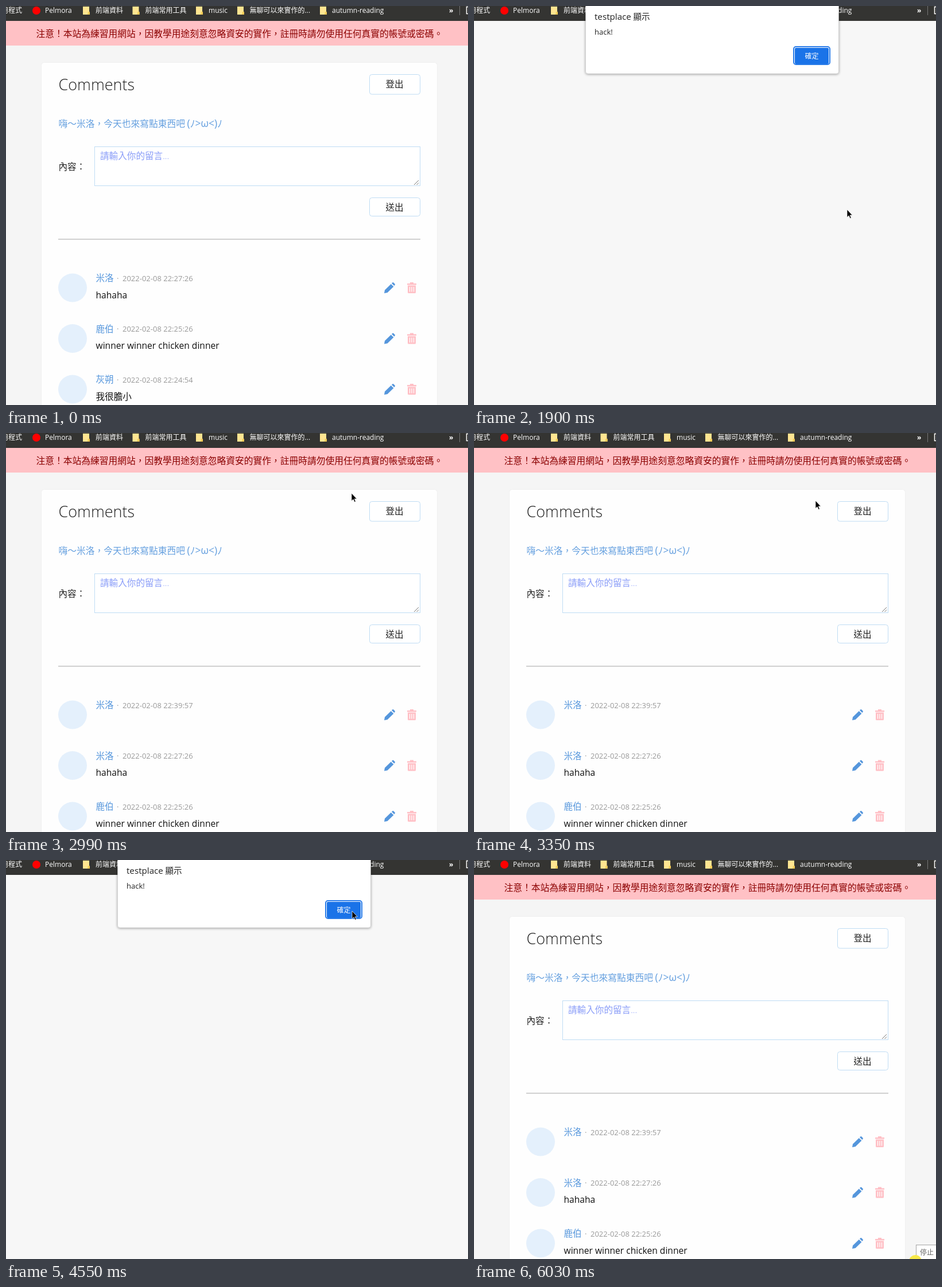
An HTML page that plays this animation: 805x696 px, repeating every 6060 ms.

```html
<!DOCTYPE html>
<html lang="zh-Hant">
<head>
<meta charset="utf-8">
<style>
html, body { margin: 0; width: 100%; height: 100%; overflow: hidden; background: #f5f5f5; }
svg { display: block; font: 15.6px "Open Sans", "Noto Sans CJK TC", "Noto Sans CJK JP", sans-serif; }
text { white-space: pre; }
.bar { font-size: 12px; fill: #fff; }
.thin { font-weight: 300; }
.name { font-weight: 500; fill: #5596dc; }
.date { font-size: 13px; fill: #999; }
.line { fill: #fff; stroke: #bfdcf4; }
</style>
</head>
<body>
<svg id="stage" width="805" height="696" viewBox="0 0 805 696">
  <defs>
    <filter id="soft" x="-10%" y="-10%" width="120%" height="125%">
      <feDropShadow dx="0" dy="1" stdDeviation="2" flood-opacity=".4"/>
    </filter>
    <g id="folder">
      <path d="M0 1h11v9h1v5H0z" fill="#ffe591"/>
      <path d="M9 10h3v5H8z" fill="#f5cc58"/>
    </g>
    <g id="icons">
      <path fill="#5596dc" d="M659 501l1-5.500 10.800-10.600 4.600 4.600L664.600 500zM672 483.700l1.300-1.200q1-.9 2 0l2.200 2.200q1 1 0 2l-1.200 1.300z"/>
      <path fill="#ffc0c6" d="M699 484h5v-2h6v2h5v2.500h-16zM700 487.500h14v12q0 1.500-1.500 1.500h-11q-1.500 0-1.500-1.500z"/>
      <path stroke="#fff" stroke-width="1.300" d="M703.500 490v8.500M707 490v8.500M710.500 490v8.500"/>
    </g>
  </defs>
  <rect width="805" height="696" fill="#f7f7f7"/>
  <g id="page"></g>
  <g id="bar"></g>
  <g id="dialog"></g>
  <g id="stop">
    <g id="tip">
      <rect x="770.500" y="671.500" width="40" height="30" fill="#fff" stroke="#a5a5a5"/>
      <text x="777" y="689" font-size="12" fill="#666">停止</text>
    </g>
    <circle cx="769" cy="700" r="11" fill="#f7e94a"/>
  </g>
  <path id="mouse" d="M0 0V13.500L3.100 10.700 5.300 15.500 7.300 14.600 5.200 9.900H9.300z" stroke="#fff" stroke-width=".7"/>
</svg>
<script>
const $ = id => document.getElementById(id);
const esc = s => s.replace(/&/g, '&amp;').replace(/</g, '&lt;');
const text = (x, y, s, attrs = '') => `<text x="${x}" y="${y}" ${attrs}>${esc(s)}</text>`;
const rect = (x, y, w, h, attrs) => `<rect x="${x}" y="${y}" width="${w}" height="${h}" ${attrs}/>`;
const button = (y, h, label, base) =>
  rect(633.5, y, 88, h, 'rx="4" class="line"') + text(661.5, base, label, 'class="thin" fill="#222"');

const LOOP = 6060;
const SCRIPT = '<script>alert("hack!")<\/script>';
const comments = [
  ['米洛', '22:39:57', ''],
  ['米洛', '22:27:26', 'hahaha'],
  ['鹿伯', '22:25:26', 'winner winner chicken dinner'],
  ['灰朔', '22:24:54', '我很膽小']
];

function row([name, time, body], i) {
  return `<g transform="translate(0 ${i * 88.5})">
    <circle cx="116" cy="491.5" r="25" fill="#e4f0fc"/>
    ${text(156.5, 480, name, 'class="name"')}
    ${text(193, 479.5, '·', 'class="date"')}
    ${text(203, 479.5, '2022-02-08 ' + time, 'class="date"')}
    ${text(156.5, 509.5, body, 'fill="#111"')}
    <use href="#icons"/></g>`;
}

$('page').innerHTML =
  rect(0, 26, 805, 670, 'fill="#f5f5f5"') +
  rect(0, 26, 805, 43, 'fill="#ffc1c5"') +
  text(52.5, 54, '注意！本站為練習用網站，因教學用途刻意忽略資安的實作，註冊時請勿使用任何真實的帳號或密碼。',
    'font-size="15.75" font-weight="500" fill="#8b0000"') +
  rect(61.5, 98.5, 690, 620, 'rx="5" fill="#fefefe" stroke="#f0f0f0"') +
  text(91.5, 147, 'Comments', 'font-size="27" class="thin" fill="#222"') +
  button(119.5, 34.5, '登出', 142) +
  text(91.5, 211, '嗨～米洛，今天也來寫點東西吧', 'font-size="15.75" class="thin" fill="#649fdf"') +
  text(315.5, 211, '(ﾉ>ω<)ﾉ', 'font-size="17.5" fill="#649fdf"') +
  text(91.5, 286, '內容：', 'class="thin" fill="#222"') +
  rect(154.5, 245.5, 567, 68, 'id="box" class="line"') +
  '<path d="M711 312l8-8M715.5 312l3.5-3.5" stroke="#777"/>' +
  text(164, 266.5, '請輸入你的留言...', 'id="hint" class="thin" fill="#8a9df8"') +
  text(164, 266.5, SCRIPT, 'id="typed" font-size="16.5" fill="#8093f6"') +
  button(334.5, 32, '送出', 356.5) +
  rect(91, 406, 631, 1.5, 'fill="#c2c2c2"') +
  '<g id="rows"></g>';

$('bar').innerHTML =
  rect(0, 0, 805, 26, 'fill="#343432"') +
  '<circle cx="53" cy="8" r="7" fill="#f00"/>' +
  [134, 220.5, 331, 403, 547].map(x => `<use href="#folder" x="${x}"/>`).join('') +
  [[-8, '用程式'], [68, 'Pelmora'], [156, '前端資料'], [242.5, '前端常用工具'], [353, 'music'],
   [424.5, '無聊可以來實作的...'], [568, 'autumn-reading']]
    .map(([x, s]) => text(x, 12, s, 'class="bar"')).join('') +
  text(772, 11.5, '»', 'class="bar" font-weight="700"') +
  '<path d="M790.5 0V16" stroke="#777"/><path d="M810 1.5H802.5V13.5H810" fill="none" stroke="#fff" stroke-width="1.5"/>';

$('dialog').innerHTML =
  rect(194.5, -10, 441, 128, 'rx="4" fill="#fff" stroke="#bbb" stroke-width=".5" filter="url(#soft)"') +
  text(210, 23.5, 'testplace', 'font-size="15.2" fill="#222"') +
  text(277.5, 23.5, '顯示', 'font-size="14.5" class="thin" fill="#222"') +
  text(210, 49.5, 'hack!', 'font-size="13" fill="#222"') +
  rect(557, 71, 63, 31, 'rx="4" fill="#fff" stroke="#2b7de9" stroke-width="2"') +
  rect(559, 73, 59, 28, 'rx="2" fill="#1a73e8"') +
  text(576.5, 91.5, '確定', 'class="bar"');

// Pointer stops: time, x, y
const stops = [
  [130, 470, 625], [700, 440, 272], [890, 440, 272], [1400, 630, 354], [1490, 649, 355],
  [2150, 650, 355], [2500, 588, 78], [2700, 605, 99], [2770, 605, 99], [3350, 595, 118],
  [3530, 593, 144], [4310, 593, 144], [4550, 603, 89], [4750, 603, 89], [4940, 622, 134],
  [5450, 787, 697]
];

function pointer(t) {
  const i = stops.findIndex(s => s[0] > t);
  if (i < 0) return stops[stops.length - 1].slice(1);
  const [t0, x0, y0] = stops[Math.max(0, i - 1)], [t1, x1, y1] = stops[i];
  const u = Math.max(0, (t - t0) / (t1 - t0 || 1));
  const k = u * u * (3 - 2 * u);
  return [x0 + (x1 - x0) * k, y0 + (y1 - y0) * k];
}

const show = (id, on) => { $(id).style.display = on ? '' : 'none'; };
const within = (t, a, b) => t >= a && t < b;
let posted = null;

function draw(now) {
  const t = now % LOOP;
  const alert = within(t, 1700, 2880) || within(t, 3760, 4780);
  const focus = within(t, 650, 1700);
  const typed = within(t, 950, 1700);
  if (posted !== t >= 1700) {
    posted = t >= 1700;
    $('rows').innerHTML = comments.slice(posted ? 0 : 1).map(row).join('');
  }
  show('page', !alert);
  show('dialog', alert);
  show('hint', !typed);
  show('typed', typed);
  $('box').style.stroke = focus ? '#7093f2' : '';
  $('box').style.strokeWidth = focus ? 2 : 1;
  $('box').setAttribute('rx', focus ? 2 : 0);
  show('stop', t >= 5910);
  show('tip', t >= 5970);
  show('mouse', t >= 130);
  $('mouse').setAttribute('transform', `translate(${pointer(t).map(Math.round)})`);
  requestAnimationFrame(() => draw(performance.now()));
}
draw(0);
</script>
</body>
</html>
```
